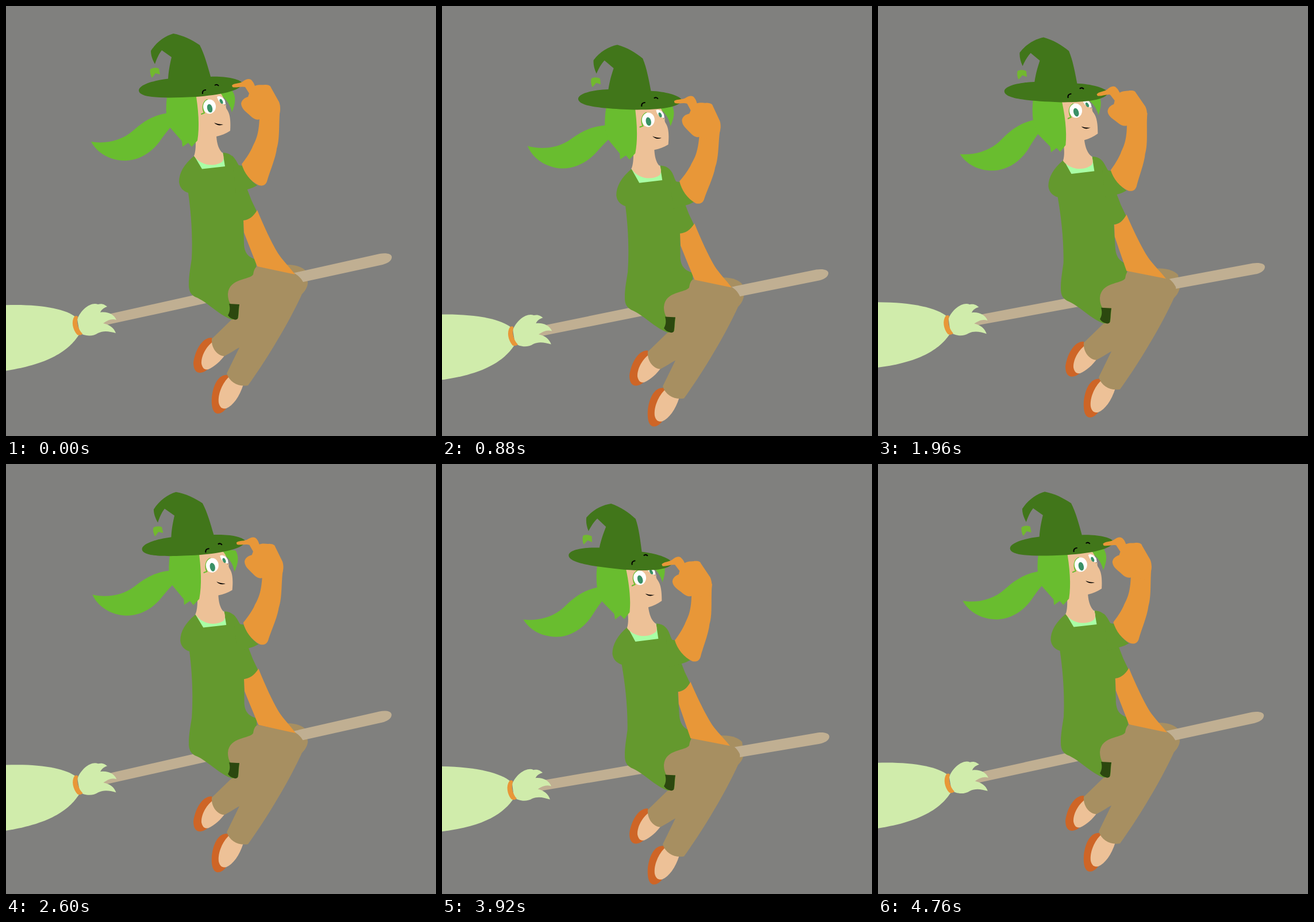
An HTML page for the animation above (4800 ms loop, 748 by 748 pixels).

```html
<!DOCTYPE html>
<html lang="en">
<head>
<meta charset="utf-8">
<title>Witch on a broom</title>
<style>
html, body { margin: 0; width: 100%; height: 100%; overflow: hidden; background: #80807e; }
svg { display: block; width: 100%; height: 100%; }
.hat { fill: #41761a; }
.hair { fill: #69bd2f; }
.shirt { fill: #64992e; }
.skin { fill: #edc197; }
.glove { fill: #e89738; }
.pants { fill: #a78f61; }
.shoe { fill: #ce6526; }
.straw { fill: #d0ecab; }
.wood { fill: #c0af92; }
.iris { fill: #3a9066; }
.lash { fill: none; stroke: #69bd2f; stroke-width: 2; stroke-linecap: round; }
.brow { fill: none; stroke: #000; stroke-width: 2; }
</style>
</head>
<body>
<svg viewBox="0 0 748 748">
<g id="rider">
  <path class="pants" d="M484 450 C505 449 516 455 522 461 L525 482 C524 490 520 496 514 502 L484 490 Z"/>
  <g id="broom">
    <path class="wood" d="M164 539.300 L650 431 C662 429 670 431 671 436 C672 443 663 448 655 450 L164 557 Z"/>
    <path class="straw" d="M-40 523 C40 515 100 524 121 541 L128 570 C110 600 70 630 -40 639 Z"/>
    <path class="straw" d="M124 545 C130 528 148 514 160 519 C168 517 172 520 176 523 C170 525 166 528 164 533 C176 531 188 536 192 546 C184 543 176 547 169 552 C180 554 188 560 191 569 C180 566 170 564 160 569 C150 576 135 574 128 568 Z"/>
    <path class="glove" d="M119 540 C122 538 125 539 125 541 C122 551 126 563 133 570 C131 573 127 573 124 572 C116 563 113 549 119 540 Z"/>
  </g>
  <path class="shoe" d="M386 642 C372 640 361 655 358 680 C357 695 359 708 368 709 C375 709 381 704 384 698 L392 650 Z"/>
  <path class="skin" d="M388 645 C377 655 368 675 370 690 C372 700 378 701 383 700 C395 695 406 680 413 658 Z"/>
  <path class="shoe" d="M358 577 C343 576 330 595 326 620 C326 632 330 638 338 638 C345 637 348 634 351 632 L362 590 Z"/>
  <path class="skin" d="M360 584 C348 592 339 610 340 622 C342 632 347 633 352 632 C363 627 373 618 381 607 Z"/>
  <path class="shirt" id="torso"/>
  <path class="pants" d="M437 453 C433 455 431 460 430 467 C424 477 388 473 386 501 C386 509 388 515 391 519 L406 519 L404 543 L392 546 L358 579 C357 590 362 600 369 605 Q374 609 380 609 C390 604 398 598 406 594 L384 639 C389 655 405 663 421 660 C450 620 490 555 514 503 C516 497 519 492 518 482 C514 474 508 468 500 464 Z"/>
  <path fill="#2c480f" d="M388 518 L406 519 C404 528 405 537 403 544 Q400 547 396 545 C392 544 389 542 386 538 C390 531 390 525 388 518 Z"/>
  <path class="glove" id="prop"/>
  <path class="shirt" id="sleeve" d="M393 260 C401 268 402 273 405 277 L411 278 C416 290 425 304 437 312 C432 315 427 317 420 319 L400 325 Z"/>
  <path fill="#a9ffa5" id="collar"/>
  <g id="head">
    <path class="hair" id="tail" d="M282 186 C255 190 238 202 222 216 C200 236 170 240 148 236 C158 255 180 269 208 269 C235 268 255 252 267 236 C274 226 280 218 287 210 Z"/>
    <path class="hair" d="M368 146 L394 148 C400 158 400 168 393 185 C391 175 386 165 376 157 Z"/>
    <path class="skin" d="M326 148 L370 148 C376 154 381 162 380 173 L383 171 C382 176 383 178 385 181 C390 189 391 200 390 217 C382 222 375 225 366 227 C367 240 370 250 377 256 C380 264 378 269 376 271 C364 280 340 279 327 261 C330 253 330 245 330 234 Z"/>
    <path class="hair" d="M282 146 C279 160 278 175 279 190 L285 211 L306 235 L307 245 L317 238 L323 245 L333 234 C337 210 335 180 329 146 Z"/>
    <g id="eyes">
      <path class="lash" d="M340 188 L345 186 C341 178 342 167 350 163"/>
      <ellipse cx="354" cy="175" rx="11" ry="12.500" fill="#fff"/>
      <ellipse class="iris" cx="354.500" cy="178" rx="4.500" ry="7.500" transform="rotate(-14 354.500 178)"/>
      <path fill="#fff" d="M367 158 C372 155 379 160 381 165 L382 171 C377 171 370 169 367 158 Z"/>
      <ellipse class="iris" cx="374.500" cy="166" rx="2.500" ry="4.500" transform="rotate(-25 374.500 166)"/>
    </g>
    <path class="lash" id="lid" d="M340 185 C347 184 352 178 363 181"/>
    <path d="M362 203 Q369 206 378 206 Q369 210 362 203 Z"/>
    <g id="hat">
      <path class="hat" d="M231 147 C231 138 253 130 282 126.500 C283 110 286 98 288 89 L271 77 C266 83 262 92 259 101 C254 92 252 85 252 78 C262 62 277 52 291 48 C308 51 324 59 337 68 C345 83 351 105 356 123 C380 122 405 126 411 134 C410 148 370 155 330 158 C270 161 232 160 231 147 Z"/>
      <path fill="#72b82f" d="M251 110 C255 107 262 107 266 109 L268 119 L260 117 L254 125 C251 120 250 114 251 110 Z"/>
    </g>
    <g class="brow" id="brows">
      <path d="M342 153 C341 148 344 146 348 146"/>
      <path d="M363 138 Q367 135 370 139"/>
    </g>
  </g>
  <g class="glove" id="arm">
    <path d="M410 275 C420 262 424 255 428 247 C433 235 440 228 441 192 L460 178 L477 178 C474 200 477 230 471 248 C469 265 458 290 454 305 C451 313 445 313 440 312 C425 305 414 290 410 275 Z"/>
    <path id="hand" d="M393 138 C397 134 405 135 411 132 C418 127 424 125 428 130 C431 133 432 137 433 139 C440 136 446 138 450 137 C456 137 460 138 461 142 L475 167 C478 175 477 182 476 187 L470 202 L441 197 C436 199 430 196 425 191 C418 184 410 180 409 170 C410 163 415 160 421 158 L423 152 L416 141 C410 139 400 143 394 141 Z"/>
  </g>
</g>
</svg>
<script>
const LOOP = 4800, CYCLE = 2400, STEP = 40;
const TORSO = "M327 261 C310 275 301 290 301 306 C302 316 308 322 317 325 C322 360 325 400 323 440 C320 460 318 470 318 485 C318 497 322 502 329 506 C350 514 370 538 394 546 L404 544 L435 470 L435 441 C420 437 415 428 414 415 L413 373 C422 372 430 367 436 357 L427 338 L417 312 L402 276 C398 264 392 256 378 255 L375 265 L335 265 Z";
const PROP = "M437 355 C430 367 422 372 413 373 L414 394 C420 410 430 435 437 453 L503 467 C492 453 481 442 473 430 C462 412 448 382 437 355 Z";
const COLLAR = "M327 260 L341 283.5 L381 279 L377 255 Z";

const el = {};
document.querySelectorAll("[id]").forEach(n => el[n.id] = n);

const clamp = v => Math.max(0, Math.min(1, v));
const smooth = v => { v = clamp(v); return v * v * (3 - 2 * v); };

// cubic-bezier(K, 0, 1 - K, 1)
const K = 0.48;
function ease(x) {
  let lo = 0, hi = 1;
  for (let i = 0; i < 22; i++) {
    const s = (lo + hi) / 2, r = 1 - s;
    if (3 * K * s * r * r + 3 * (1 - K) * s * s * r + s * s * s < x) lo = s; else hi = s;
  }
  return smooth((lo + hi) / 2);
}

// Eased swing that is 1 at the peak and 0 half a cycle later
function swing(t, peak) {
  const d = (((t - peak) % CYCLE) + CYCLE) % CYCLE;
  return ease(Math.abs(1 - d / (CYCLE / 2)));
}
const delta = (t, peak) => swing(t, peak) - swing(0, peak);

const move = (x, y) => `translate(${x.toFixed(3)} ${y.toFixed(3)}) `;
const turn = (a, x, y) => `rotate(${a.toFixed(3)} ${x} ${y})`;
const pose = (id, value) => el[id].setAttribute("transform", value);

// Moves every point of a path by the offset that fn gives for it
function warp(id, d, fn) {
  el[id].setAttribute("d", d.replace(/(-?[\d.]+) (-?[\d.]+)/g, (_, x, y) => {
    const [dx, dy] = fn(+x, +y);
    return (+x + dx).toFixed(2) + " " + (+y + dy).toFixed(2);
  }));
}

function draw(t) {
  const bob = delta(t, 1200);
  const sway = delta(t, 540);
  const trail = delta(t, 660);
  const tip = delta(t, 1420);
  const lean = 8.6 * sway, droop = 1.8 * tip, nod = 6 * sway;

  pose("rider", move(0, 25.7 * bob));
  pose("broom", turn(3.1 * delta(t, 1515), 355, 500));

  warp("torso", TORSO, (x, y) => {
    const w = smooth((470 - y + 3 * Math.max(0, x - 414)) / 170) * clamp((510 - y) / 40);
    return [lean * w, droop * w * clamp((y - 250) / 40)];
  });
  warp("prop", PROP, x => {
    const w = 1 - 0.55 * clamp(x < 437 ? (437 - x) / 24 : (x - 437) / 66);
    return [lean * w, droop * w];
  });
  warp("collar", COLLAR, (x, y) => [lean, 1.8 * droop * (y - 255) / 28]);

  pose("head", move(lean, 0.4 * droop) + turn(nod, 350, 270));
  pose("tail", move(0, 0.6 * droop) + turn(11 * trail - nod, 283, 198));
  pose("hat", move(0, -0.4 * droop) + turn(9 * tip - nod, 320, 147));
  pose("brows", move(0, -0.7 * droop));

  const drop = 10 * delta(t, 1240);
  pose("sleeve", move(lean, 0.7 * drop));
  pose("arm", move(lean, drop) + turn(4.7 * trail, 430, 295));
  pose("hand", turn(6.5 * sway, 460, 188));

  const open = clamp((Math.abs(t - 3280) - 60) / 120);
  pose("eyes", `translate(0 ${(182 * (1 - open)).toFixed(2)}) scale(1 ${open.toFixed(3)})`);
  el.eyes.style.display = open > 0.05 ? "" : "none";
  el.lid.style.display = open < 0.3 ? "" : "none";
}

const start = performance.now();
function frame() {
  const t = (performance.now() - start) % LOOP;
  draw(Math.floor(t / STEP) * STEP);
  requestAnimationFrame(frame);
}
frame();
</script>
</body>
</html>
```
